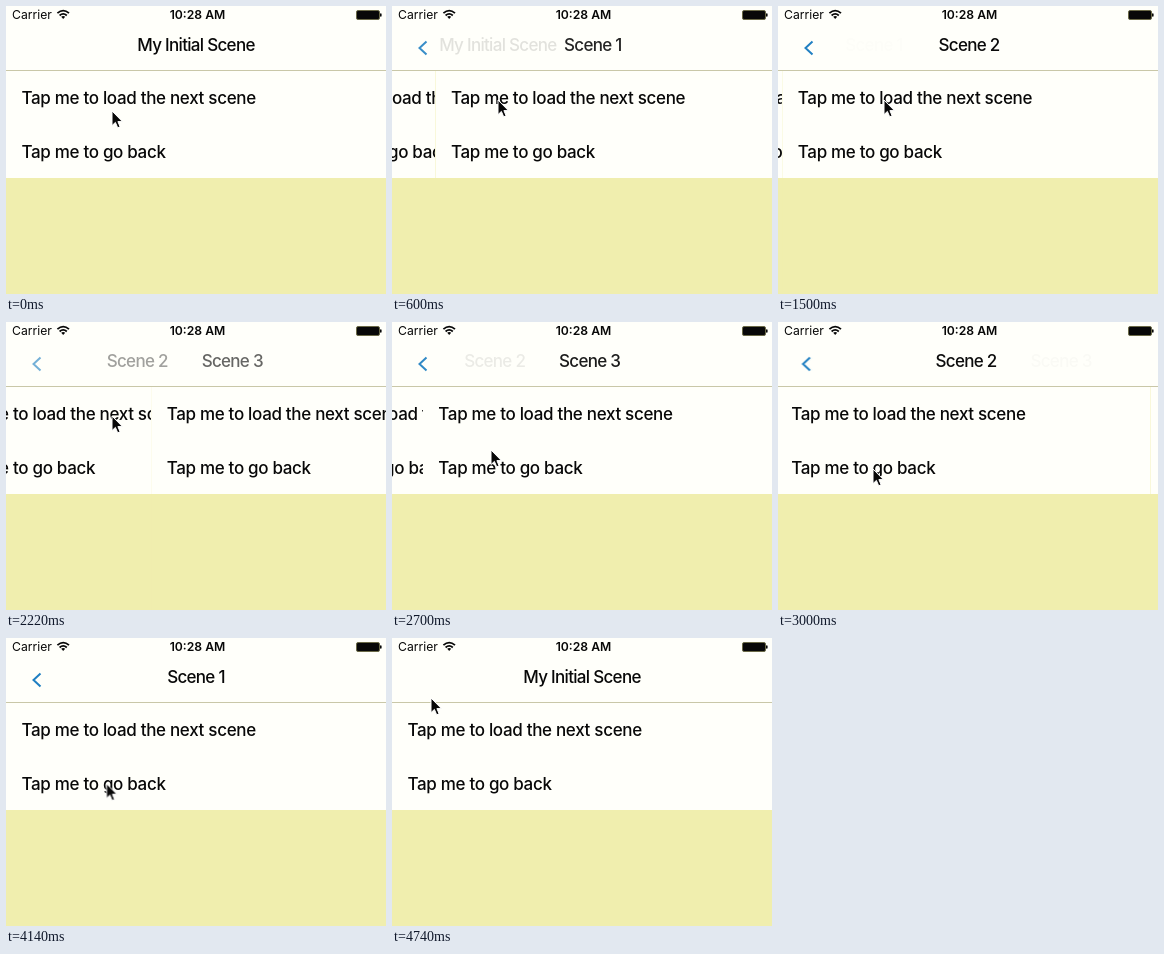
Animation of 380 by 288 pixels, one loop 4.8 s. Source, as an HTML page:

```html
<!DOCTYPE html>
<html lang="en">
<head>
<meta charset="utf-8">
<title>Scene navigation</title>
<style>
  html, body { margin: 0; width: 100%; height: 100%; overflow: hidden; background: #fffffa; }
  svg { display: block; width: 380px; height: 288px; }
  text { font-family: Inter, Roboto, sans-serif; font-size: 17px; font-weight: 500; fill: #080808; }
  .cell { letter-spacing: -.32px; }
  .title { letter-spacing: -.7px; text-anchor: middle; }
  .status { font-size: 12.2px; font-weight: 400; }
  .clock { font-weight: 600; text-anchor: middle; }
  .chevron { fill: none; stroke: #1f7fc2; stroke-width: 2; }
</style>
</head>
<body>
<svg viewBox="0 0 380 288">
  <g id="pages"></g>
  <rect width="380" height="65" fill="#fffffa"/>
  <rect y="64" width="380" height="1" fill="#c9c7a8"/>
  <g id="bar"></g>
  <g id="status">
    <text class="status" x="6" y="13">Carrier</text>
    <g fill="none" stroke="#080808" stroke-width="1.8">
      <path d="M51.4 7.2Q57.2 2 63 7.2M53.6 9.5Q57.2 6.3 60.8 9.5"/>
      <path d="M57.2 13L55.2 10.8Q57.2 9.2 59.2 10.8Z" fill="#080808" stroke="none"/>
    </g>
    <text class="status clock" x="191.5" y="13">10:28 AM</text>
    <rect x="350.5" y="4.5" width="23" height="9" rx="1.5" fill="#080808" stroke="#6b6a48"/>
    <rect x="374" y="7.3" width="1.6" height="3.4" rx=".8" fill="#080808"/>
  </g>
  <path id="cursor" fill="#080808" stroke="#fff" stroke-width="1"
        d="M0 0V14.6L3.4 11.4L5.7 16.8L8.1 15.8L5.9 10.6H10.4Z"/>
</svg>
<script>
const LOOP = 4800, TICK = 60, SLIDE = 480, WIDTH = 380;
const CURVE = 'cubic-bezier(.36,.66,.04,1)';
const titles = ['My Initial Scene', 'Scene 1', 'Scene 2', 'Scene 3'];
const deepest = titles.length - 1;

// Slides go forward to the deepest scene, then back again
const taps = [412, 1146, 2112, 2680, 3275, 4250];
const shownAfter = count => deepest - Math.abs(deepest - count);

// Pointer stops: time, x, y
const stops = [
  [0, 106, 105], [300, 106, 94], [2280, 106, 94],
  [3000, 95, 147], [3420, 116, 134], [4240, 100, 146], [4740, 39, 60]
];

const byId = id => document.getElementById(id);
const clamp = v => Math.max(-1, Math.min(1, v));
const shift = (x, y = 0) => `translate(${x}px, ${y}px)`;
const fade = (r, power = 1) => 1 - Math.abs(r) ** power;
const clips = [];

function add(parent, markup) {
  const g = document.createElementNS('http://www.w3.org/2000/svg', 'g');
  g.innerHTML = markup;
  parent.append(g);
  return g;
}

function play(el, frames) {
  const clip = el.animate(frames, { duration: LOOP, iterations: Infinity });
  clip.pause();
  clips.push(clip);
}

// pose() maps a scene's place relative to the visible one (-1 left, 0 shown, 1 right) to a style
function follow(el, scene, pose) {
  const at = (time, count, easing = 'linear') =>
    ({ offset: time / LOOP, easing, ...pose(clamp(scene - shownAfter(count))) });
  play(el, [
    at(0, 0),
    ...taps.flatMap((tap, i) => [at(tap, i, CURVE), at(tap + SLIDE, i + 1)]),
    at(LOOP, taps.length)
  ]);
}

titles.forEach((name, i) => {
  const page = add(byId('pages'), `
    <rect y="65" width="380" height="107" fill="#fffffa"/>
    <rect y="172" width="380" height="116" fill="#f0eeae"/>
    <text class="cell" x="15.5" y="98">Tap me to load the next scene</text>
    <text class="cell" x="15.5" y="152">Tap me to go back</text>`);
  follow(page, i, r => ({ transform: shift(r * WIDTH * (r > 0 ? 1 : .3)) }));

  const title = add(byId('bar'), `<text class="title" x="190" y="45">${name}</text>`);
  follow(title, i, r => ({ transform: shift(r * WIDTH / 4), opacity: fade(r) }));

  if (i > 0) {
    const back = add(byId('bar'), '<path class="chevron" d="M34.5 35.5L27.5 42L34.5 48.5"/>');
    follow(back, i, r => ({ transform: shift(Math.min(r, 0) * WIDTH / 3), opacity: fade(r) }));
  }
});

const last = stops[stops.length - 1];
play(byId('cursor'), [...stops, [LOOP, last[1], last[2]]].map(([time, x, y]) =>
  ({ offset: time / LOOP, easing: 'ease-in-out', transform: shift(x, y) })));

const begin = performance.now();
function draw() {
  const elapsed = Math.max(0, performance.now() - begin) % LOOP;
  const time = Math.floor(elapsed / TICK) * TICK;
  clips.forEach(clip => { clip.currentTime = time; });
  requestAnimationFrame(draw);
}
draw();
</script>
</body>
</html>
```
